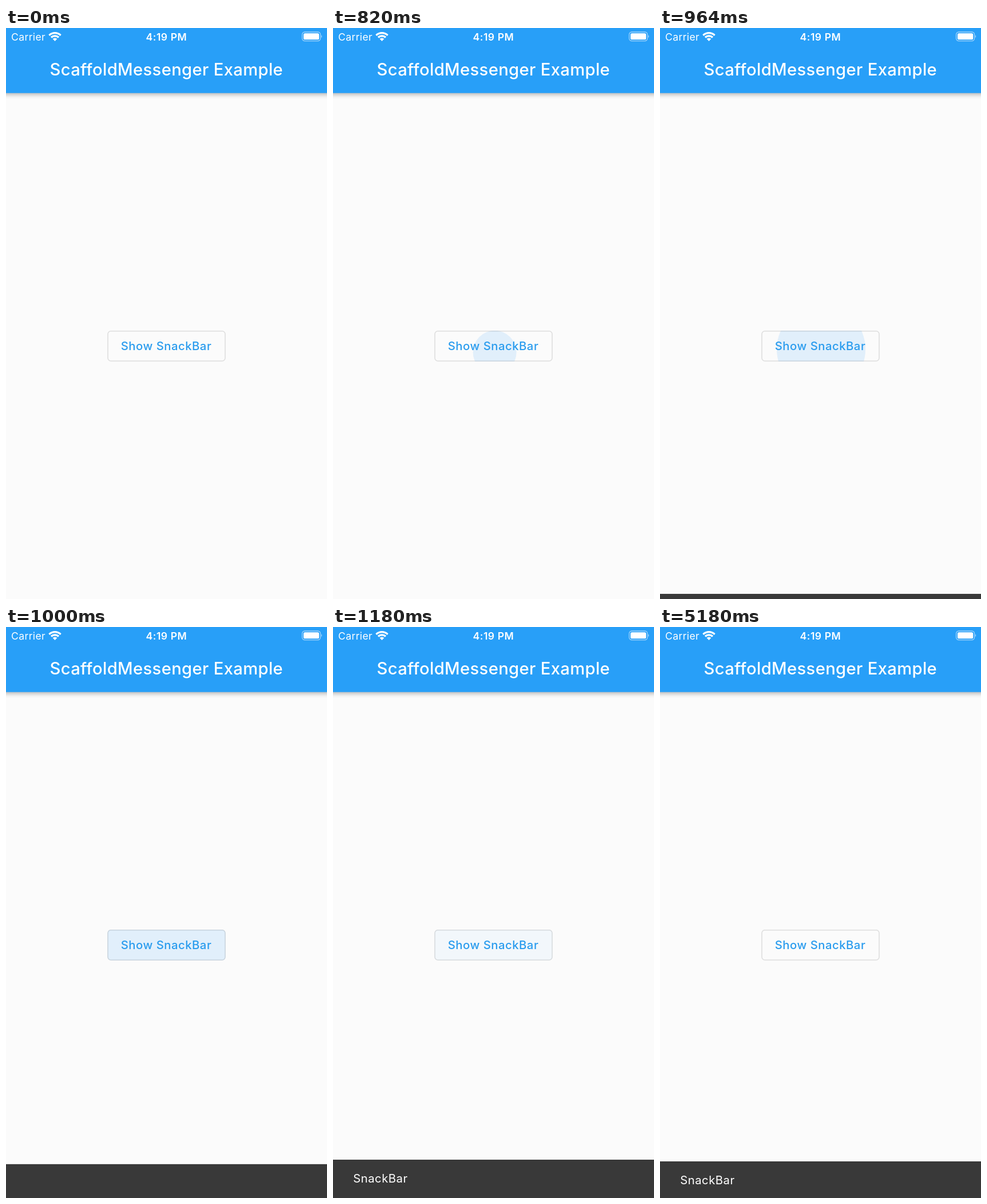
An HTML page that plays this animation: 561x998 px, repeating every 5270 ms.

```html
<!DOCTYPE html>
<html lang="en">
<head>
<meta charset="utf-8">
<title>SnackBar demo</title>
<style>
  html, body { margin: 0; width: 100%; height: 100%; overflow: hidden; background: #fbfbfb; }
  svg { display: block; width: 561px; height: 998px; }
  text { font: 400 20.3px Inter, sans-serif; letter-spacing: .5px; fill: #fff; }
  .middle { text-anchor: middle; }
  .status { font-size: 17.6px; letter-spacing: .35px; }
  .clock { font-weight: 600; letter-spacing: .55px; }
  .title { font-size: 29.2px; font-weight: 500; letter-spacing: .35px; }
  .label { font-weight: 500; letter-spacing: .5px; fill: #2a9cee; }
  .bar { fill: #289ff8; filter: drop-shadow(0 2px 4px #0005); }
</style>
</head>
<body>
<svg viewBox="0 0 561 998">
  <clipPath id="buttonClip"><rect x="177.3" y="529" width="206.4" height="53.8" rx="6"/></clipPath>

  <rect class="bar" x="-8" y="-8" width="577" height="121.7"/>
  <text class="status" x="9" y="21.8">Carrier</text>
  <g fill="none" stroke="#fff" stroke-width="3.3">
    <path d="M75.4 12.9A14.3 14.3 0 0 1 95.6 12.9M79 16.5A9.2 9.2 0 0 1 92 16.5"/>
    <path d="M85.5 23L81.6 19.1A5.5 5.5 0 0 1 89.4 19.1Z" fill="#fff" stroke="none"/>
  </g>
  <text class="status clock middle" x="280.4" y="21.8">4:19 PM</text>
  <rect x="517.6" y="7" width="32" height="15.6" rx="4.5" fill="none" stroke="#fff" stroke-opacity=".55" stroke-width="1.3"/>
  <rect x="520" y="9.3" width="27.2" height="11" rx="2.6" fill="#fff"/>
  <path d="M551 12.3Q553.4 14.8 551 17.3Z" fill="#fff" fill-opacity=".6"/>
  <text class="title middle" x="280.3" y="82.6">ScaffoldMessenger Example</text>

  <g clip-path="url(#buttonClip)"><circle id="ripple" fill="#2196f3"/></g>
  <rect x="178" y="529.7" width="205" height="52.4" rx="5.3" fill="none" stroke="#000" stroke-opacity=".12" stroke-width="1.5"/>
  <text class="label middle" x="280" y="562.8">Show SnackBar</text>

  <g id="snack">
    <rect width="561" height="68" fill="#393939"/>
    <text id="message" x="35.2" y="40.3">SnackBar</text>
  </g>
</svg>
<script>
const LOOP = 5270, TAP = 820, SETTLED = 1180, DISMISS = 5180, STEP = 90;
const SNACK_HEIGHT = 67, SLIDE = 220;
const [ripple, snack, message] = ["ripple", "snack", "message"].map(id => document.getElementById(id));
const clamp = v => Math.min(1, Math.max(0, v));
const lerp = (a, b, k) => a + (b - a) * k;

// cubic-bezier(.4, 0, .2, 1)
function ease(progress) {
  const x = clamp(progress);
  let low = 0, high = 1;
  for (let i = 0; i < 24; i++) {
    const u = (low + high) / 2, v = 1 - u;
    if (1.2 * v * v * u + .6 * v * u * u + u ** 3 < x) low = u; else high = u;
  }
  return low * low * (3 - 2 * low);
}

// The motion advances in 90 ms ticks and rests between tap and dismissal.
function tick(t) {
  if (t < TAP) return 0;
  if (t < SETTLED) return TAP + Math.floor((t - TAP) / STEP) * STEP;
  return t < DISMISS ? SETTLED : DISMISS;
}

function draw(t) {
  const radius = 38 + (t - TAP) * .439;
  const drift = clamp((radius - 38) / 79);
  ripple.setAttribute("r", Math.max(0, radius));
  ripple.setAttribute("cx", lerp(282.6, 280.5, drift));
  ripple.setAttribute("cy", lerp(566.8, 556, drift));
  ripple.setAttribute("opacity", t < TAP ? 0 : .12 * (1 - clamp((t - 1120) / STEP)));

  const entry = (t - 866) / SLIDE, exit = (t - 5152) / SLIDE;
  const shown = ease(entry) - ease(exit);
  snack.setAttribute("transform", `translate(0 ${998 - SNACK_HEIGHT * shown})`);
  message.setAttribute("opacity", clamp((entry - .62) / .38));
}

function frame() {
  draw(tick(performance.now() % LOOP));
  requestAnimationFrame(frame);
}
frame();
</script>
</body>
</html>
```
